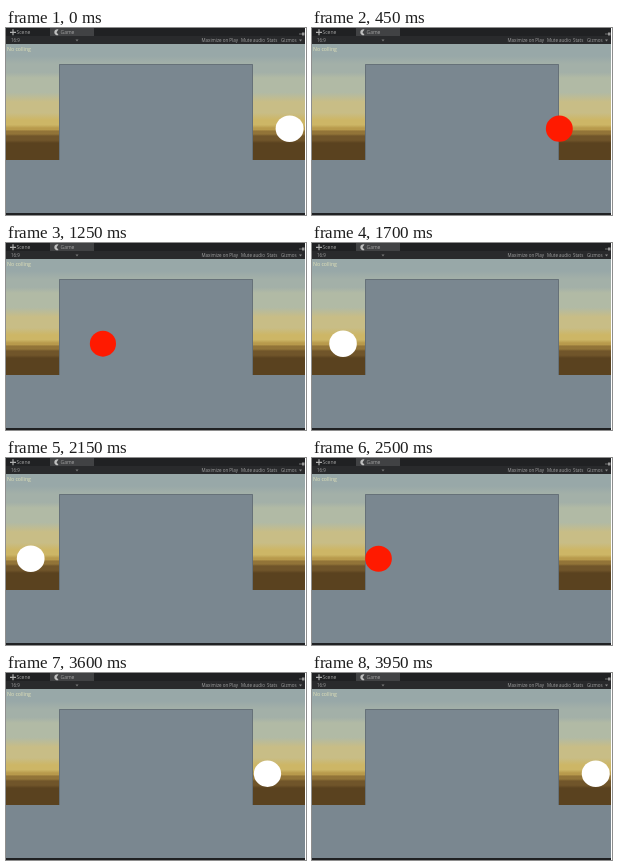
Animation, 300 px wide and 187 px high, one loop 4 s. Source, as an HTML page:

```html
<!DOCTYPE html>
<html lang="en">
<head>
<meta charset="utf-8">
<style>
  html, body { margin: 0; width: 100%; height: 100%; overflow: hidden; background: #202123; }
  svg { display: block; width: 100vw; height: 100vh; }
  text { font-family: "Open Sans", "Noto Sans", sans-serif; fill: #a2a2a2; }
  .tab { font-size: 5px; }
  .tool { font-size: 4.5px; }
</style>
</head>
<body>
<svg viewBox="0 0 300 187" preserveAspectRatio="none">
  <defs>
    <linearGradient id="sky" gradientUnits="userSpaceOnUse" x1="0" y1="0" x2="0" y2="187"></linearGradient>
  </defs>

  <rect width="300" height="187" fill="#202123"/>
  <rect x="44" width="44" height="8" fill="#414244"/>
  <rect y="8" width="300" height="8" fill="#292a2c"/>
  <path d="M4 4.3H10M7 1.3V7.3" stroke="#b0b0b0" stroke-width="1.2"/>
  <path d="M52.5 1.5A3 3 0 1 0 52.5 7L50.5 4.2Z" fill="#c0c0c0"/>
  <path d="M69.5 11.5h3l-1.5 2z" fill="#777"/>
  <path d="M293 6h3" stroke="#888" stroke-width=".8"/>
  <path d="M296 4.5h2.5v3h-2.5z" fill="#999"/>
  <text class="tab" x="10.5" y="6.3">Scene</text>
  <text class="tab" x="54.5" y="6.3">Game</text>
  <text class="tool" x="5" y="13.8">16:9</text>
  <text class="tool" x="195.5" y="13.8">Maximize on Play</text>
  <text class="tool" x="235" y="13.8">Mute audio</text>
  <text class="tool" x="261" y="13.8">Stats</text>
  <text class="tool" x="275" y="13.8">Gizmos</text>
  <path d="M293 11.5h3l-1.5 2z" fill="#888"/>

  <rect y="16" width="299" height="169" fill="url(#sky)"/>
  <rect y="132" width="299" height="53" fill="#7a8790"/>
  <rect x="53" y="36" width="194" height="97" fill="#7a8790"/>
  <path d="M53.5 132V36.5H246.5V132" fill="none" stroke="#667178"/>
  <text x="1" y="23.3" font-size="5.2" style="fill:#e2e2b8">No colling</text>
  <ellipse id="ball" cy="100.7"/>
  <rect x="299" width="1" height="187" fill="#fff"/>
</svg>
<script>
  const LOOP = 4000, STEP = 50, HEIGHT = 187;
  const MIDDLE = 151, SWING = 132.8;
  const WALL_CENTER = 150, HIT_REACH = 104;
  // Top edge and colour of each sky band.
  const SKY = [
    [16, "#98a8a8"], [36, "#a3b0a8"], [50, "#b1baa5"], [74, "#c8bd86"],
    [92, "#cdb666"], [100, "#b89a4c"], [103, "#927438"],
    [108, "#70552a"], [115, "#5a421f"], [132, "#5a421f"]
  ];
  // Time in ms and swing phase in degrees; the swing runs slightly unevenly.
  const PHASES = [
    [0, 3], [800, 75], [1100, 100.5], [1700, 154.6], [2200, 202.8],
    [2500, 230.5], [2950, 270.6], [3600, 326.3], [4000, 363]
  ];
  const ball = document.getElementById("ball");
  const sky = document.getElementById("sky");

  function addStop(y, color) {
    const stop = document.createElementNS("http://www.w3.org/2000/svg", "stop");
    stop.setAttribute("offset", y / HEIGHT);
    stop.setAttribute("stop-color", color);
    sky.append(stop);
  }

  // Each band is flat, with a soft lower edge.
  SKY.slice(0, -1).forEach(([top, color], i) => {
    const bottom = SKY[i + 1][0];
    addStop(top, color);
    addStop(top + (bottom - top) * 0.6, color);
  });

  function phaseAt(time) {
    const next = PHASES.findIndex(([t]) => t > time);
    const [t0, p0] = PHASES[next - 1], [t1, p1] = PHASES[next];
    return p0 + (p1 - p0) * (time - t0) / (t1 - t0);
  }

  function draw(time) {
    const swing = Math.cos(phaseAt(time) * Math.PI / 180);
    const x = MIDDLE + SWING * swing;
    const stretch = swing * swing;
    const hit = Math.abs(x - WALL_CENTER) < HIT_REACH;
    ball.setAttribute("cx", x);
    ball.setAttribute("rx", 12.9 + 1.1 * stretch);
    ball.setAttribute("ry", 12.9 + 0.4 * stretch);
    ball.setAttribute("fill", hit ? "#ff1a00" : "#fff");
  }

  const start = performance.now();
  function tick() {
    const elapsed = (performance.now() - start) % LOOP;
    draw(Math.floor(elapsed / STEP) * STEP);
    requestAnimationFrame(tick);
  }
  tick();
</script>
</body>
</html>
```
